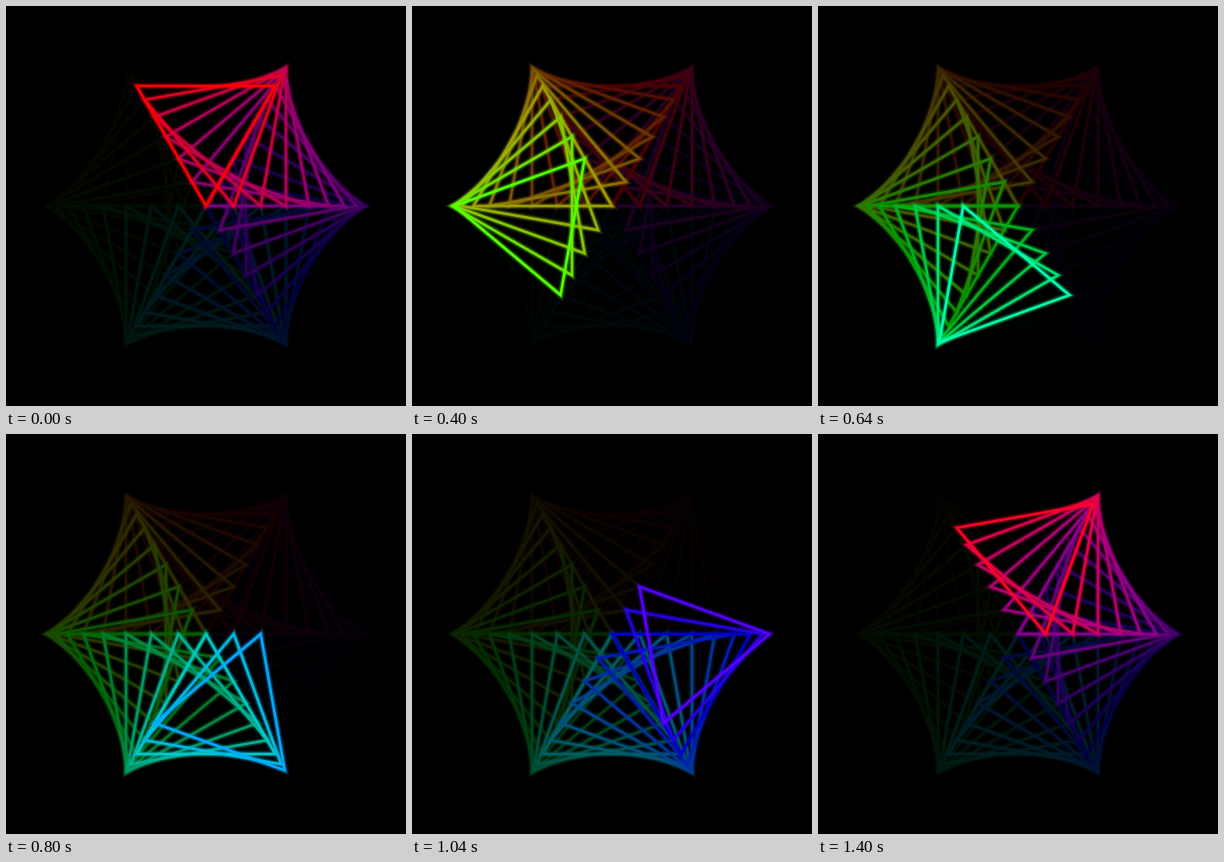
Recreate the animation shown at these times as an HTML page with a canvas. Size 400x400 px, loop 1.44 s.

```html
<!DOCTYPE html>
<html lang="en">
<head>
<meta charset="utf-8">
<title>Sliding triangle</title>
<style>
  html, body { margin: 0; width: 100%; height: 100%; overflow: hidden; background: #000; }
  canvas { display: block; width: 400px; height: 400px; }
</style>
</head>
<body>
<canvas id="stage" width="400" height="400"></canvas>
<script>
const ctx = document.getElementById('stage').getContext('2d');
const STEPS = 36;
const STEP_MS = 40;
const CENTER = 200;
const REACH = 160;
const FADE = 0.885;
// Soft edge built from nested strokes: [width, alpha]
const STROKES = [[7, 0.15], [4.5, 0.3], [2.5, 1]];

const radians = degrees => degrees * Math.PI / 180;

// Each corner swings sinusoidally along its own line through the center.
function corner(axis, phase) {
  const distance = REACH * Math.sin(radians(phase));
  return [
    CENTER + distance * Math.cos(radians(axis)),
    CENTER - distance * Math.sin(radians(axis))
  ];
}

function drawTriangle(step, brightness) {
  const angle = step * 360 / STEPS;
  ctx.beginPath();
  ctx.moveTo(...corner(0, -angle));
  ctx.lineTo(...corner(60, 60 - angle));
  ctx.lineTo(...corner(120, 60 + angle));
  ctx.closePath();
  ctx.strokeStyle = `hsl(${(angle + 360) % 360}, 100%, ${50 * brightness}%)`;
  for (const [width, alpha] of STROKES) {
    ctx.lineWidth = width;
    ctx.globalAlpha = alpha;
    ctx.stroke();
  }
}

function render(step) {
  ctx.globalAlpha = 1;
  ctx.fillStyle = '#000';
  ctx.fillRect(0, 0, 400, 400);
  for (let age = STEPS - 1; age >= 0; age--) {
    drawTriangle(step - age, FADE ** age);
  }
}

let shown = -1;
function tick() {
  const step = Math.floor(performance.now() / STEP_MS) % STEPS;
  if (step !== shown) render(shown = step);
  requestAnimationFrame(tick);
}
tick();
</script>
</body>
</html>
```
